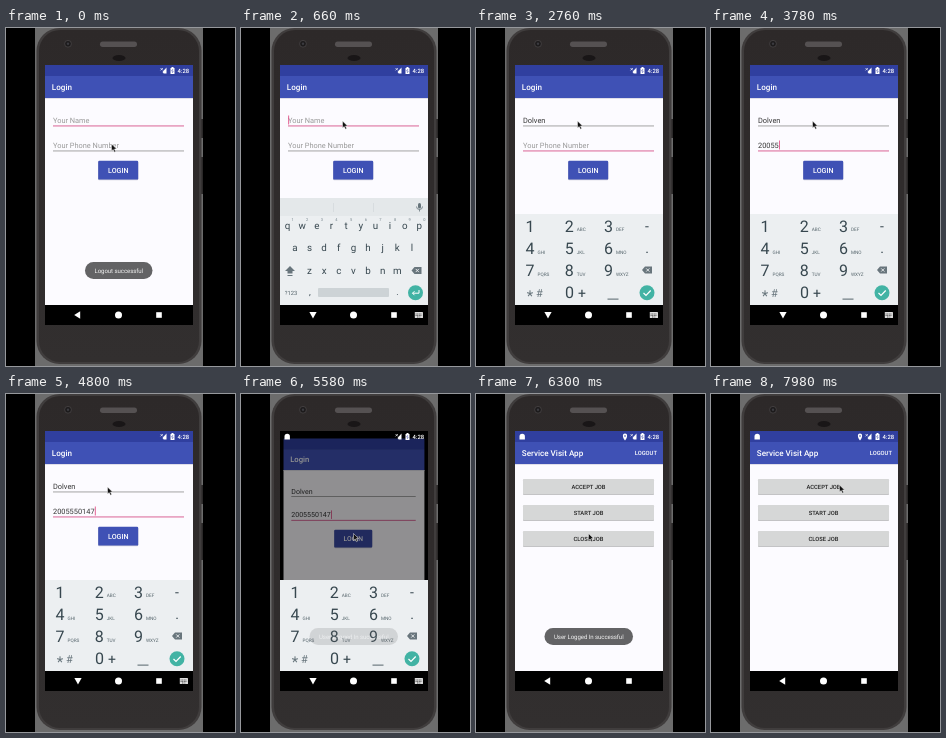
An HTML page for the animation above (8000 ms loop, 229x338 px).

```html
<!DOCTYPE html>
<html lang="en">
<head>
<meta charset="utf-8">
<title>Login demo</title>
<style>
html, body { margin: 0; width: 100%; height: 100%; overflow: hidden; background: #000; }
svg { display: block; width: 100vw; height: 100vh; font-family: Roboto, sans-serif; text-rendering: geometricPrecision; }
.bold { font-weight: 500; }
</style>
</head>
<body>
<svg id="stage" viewBox="0 0 229 338">
  <defs>
    <clipPath id="screen"><rect x="39" y="37" width="148" height="260"/></clipPath>
    <linearGradient id="shell" x2="0" y2="1">
      <stop offset="0" stop-color="#2d2929"/><stop offset="1" stop-color="#322f2f"/>
    </linearGradient>
  </defs>
  <rect width="229" height="338"/>
  <rect x="29" width="168" height="338" fill="#6c6c6c"/>
  <rect x="194" y="91" width="3" height="19" fill="#2a2828"/>
  <rect x="194" y="129" width="3" height="37" fill="#2a2828"/>
  <rect x="30.5" y="0" width="165" height="336" rx="23" fill="#403d3d"/>
  <rect x="33" y="2" width="160" height="332" rx="21" fill="url(#shell)"/>
  <circle cx="62" cy="15.8" r="3.4" fill="#1d1b1c" stroke="#494647" stroke-width=".8"/>
  <circle cx="62" cy="15.8" r="1.2" fill="#3b3b40"/>
  <rect x="94" y="13.5" width="37" height="5.5" rx="2.7" fill="#555152"/>
  <ellipse cx="113" cy="30" rx="6.5" ry="3" fill="#191617"/>
  <g clip-path="url(#screen)">
    <rect x="39" y="37" width="148" height="260"/>
    <g id="login"></g>
    <g id="main"></g>
    <g id="status"></g>
    <g id="letters"></g>
    <g id="numbers"></g>
    <g id="firstToast"></g>
    <g id="secondToast"></g>
    <g id="nav"></g>
  </g>
  <path id="pointer" d="M0 0V8.2L2 6.5L3.4 9.6L4.9 8.9L3.5 5.9H6Z" fill="#111" stroke="#fff" stroke-width=".55"/>
</svg>
<script>
const LOOP = 8000;
const NAME = 'Dolven', PHONE = '2005550147';
const NAME_START = 700, NAME_STEP = 100;
const PHONE_START = 3050, PHONE_STEP = 160;
const OPEN_AT = 430, NUMERIC_AT = 1800, PRESS_AT = 5440, MAIN_AT = 5640;

const $ = id => document.getElementById(id);
const text = (x, y, size, str, fill = '#222', extra = '') =>
  `<text x="${x}" y="${y}" font-size="${size}" fill="${fill}" ${extra}>${str}</text>`;
const mid = (x, y, size, str, fill, extra = '') =>
  text(x, y, size, str, fill, `text-anchor="middle" ${extra}`);
const rect = (x, y, w, h, fill, extra = '') =>
  `<rect x="${x}" y="${y}" width="${w}" height="${h}" fill="${fill}" ${extra}/>`;
const path = (d, fill, extra = '') => `<path d="${d}" fill="${fill}" ${extra}/>`;
const bold = 'class="bold"';

const appBar = title =>
  rect(39, 37, 148, 11, '#303f9f') + rect(39, 48, 148, 22, '#3f51b5') +
  text(45.8, 61.6, 8.1, title, '#fff', bold);

const page = rect(39, 70, 148, 207, '#fcfbff') + rect(39, 70, 148, .7, '#d3d3e0');

const field = (id, y) =>
  text(47, y + 3, 7.4, '', '#333', `id="${id}"`) +
  rect(47, y + 5.5, 131, .9, '#999', `id="${id}Line"`) +
  rect(47, y - 4.5, .8, 9, '#e0407c', `id="${id}Caret"`);

const backspace = (x, y) =>
  path(`M${x - 5} ${y}l3-3.5h7v7h-7z`, '#68757c') +
  path(`M${x - .8} ${y - 1.6}l3.2 3.2m0-3.2l-3.2 3.2`, 'none', 'stroke="#edf0f2" stroke-width=".9"');

const toast = (x, w, str) =>
  rect(x, 234, w, 17, '#636365', 'rx="8.5"') +
  mid(x + w / 2, 244.8, 6.1, str, '#f1f1f1', 'letter-spacing="-.08"');

function build() {
  $('login').innerHTML = appBar('Login') + page +
    field('name', 92) + rect(47, 96, 25, .6, '#333', 'id="composing"') + field('phone', 117) +
    rect(92, 133.3, 40.3, 19, '#c9c9d6', 'rx="1.2"') +
    rect(92.2, 132.8, 40, 18.8, '#3f51b5', 'rx="1.2" id="loginButton"') +
    mid(112.3, 145, 7.1, 'LOGIN', '#fff', bold) +
    rect(39, 37, 148, 260, '#000', 'id="dim"');

  const jobs = ['ACCEPT JOB', 'START JOB', 'CLOSE JOB'].map((label, i) =>
    rect(47, 85.5 + 26 * i, 131, 15.5, '#bcbcbe', 'rx="1"') +
    rect(47, 85 + 26 * i, 131, 15.2, '#d6d7d7', 'rx="1"') +
    mid(112.5, 94.7 + 26 * i, 5.8, label, '#222', bold));
  $('main').innerHTML = appBar('Service Visit App') +
    text(158.7, 61, 5.8, 'LOGOUT', '#fff', bold) + page + jobs.join('');

  $('status').innerHTML =
    path('M160.5 39.5v6h-2.8l-1.2-1.5z', '#fff') +
    path('M154.5 40l2.4 2.4m0-2.4l-2.4 2.4', 'none', 'stroke="#fff" stroke-width=".7"') +
    path('M164.5 40h1v-1h2v1h1v6h-4z', '#fff') +
    path('M167 41l-1.5 2h1.7l-1 2', 'none', 'stroke="#303f9f" stroke-width=".5"') +
    text(171.5, 45.2, 5.9, '4:28', '#fff', bold) +
    `<g id="notice">${path('M43.5 45.5v-3a2.7 2.7 0 0 1 5.4 0v3z', '#fff')}</g>` +
    `<g id="place">${path('M149 46.5c-3-3.5-2.6-7 0-7s3 3.5 0 7z', '#fff')}<circle cx="149" cy="42" r=".8" fill="#303f9f"/></g>`;

  $('firstToast').innerHTML = toast(79, 67.5, 'Logout successful');
  $('secondToast').innerHTML = toast(68.5, 88.5, 'User Logged In successful');
  $('letters').innerHTML = letterKeys();
  $('numbers').innerHTML = numberKeys();
  $('nav').innerHTML = rect(39, 277, 148, 20, '#000') + path('', '#fff', 'id="back"') +
    '<circle cx="112.5" cy="287" r="3.5" fill="#fff"/>' + rect(150.2, 284.2, 5.6, 5.6, '#fff') +
    `<g id="switcher">${rect(173.8, 284, 8.2, 6, '#ddd', 'rx=".6"')}` +
    path('M174.6 286h6.5m-6.5 1.5h6.5M176 289h3.5', 'none', 'stroke="#222" stroke-width=".7" stroke-dasharray="1 .6"') + '</g>';
}

function letterKeys() {
  const row = (chars, x, y, size = 9.8, fill = '#37474f') =>
    [...chars].map((c, i) => mid(x + 14.65 * i, y, size, c, fill)).join('');
  return rect(39, 170, 148, 108, '#eceff1') + rect(39, 170, 148, 18, '#e4e8ea') +
    `<g id="hints">${mid(72.5, 182, 7.3, NAME + "'s", '#66747b')}` +
    mid(152, 182, 7.3, 'Dolmen', '#66747b') +
    mid(112.5, 187, 6, '•••', '#66747b', 'letter-spacing="-.5"') + '</g>' +
    mid(112.5, 182, 7.3, '', '#37474f', 'id="guess" font-weight="600"') +
    rect(92, 175, .5, 9, '#cbd1d4') + rect(132.5, 175, .5, 9, '#cbd1d4') +
    rect(177, 175, 3, 5.5, '#66747b', 'rx="1.5"') +
    path('M175.5 178.5a3 3 0 0 0 6 0M178.5 181.5v2', 'none', 'stroke="#66747b" stroke-width=".8"') +
    row('1234567890', 51.5, 193, 4, '#78868d') +
    row('qwertyuiop', 46.5, 201.3) + row('asdfghjkl', 53.8, 223.3) + row('zxcvbnm', 68.5, 245.5) +
    path('M49 238l5 5h-2.5v2.5h-5V243H44z', '#68757c') + rect(46.5, 247, 5, 1, '#68757c') +
    backspace(175.5, 242.5) +
    mid(50, 267, 5.8, '?123', '#55646b') + mid(69, 267, 9, ',', '#37474f') +
    rect(77, 260, 71, 9, '#cdd3d6', 'rx="1"') + mid(156.5, 267, 9, '.', '#37474f') +
    '<circle cx="174.5" cy="264.7" r="7.5" fill="#42b3a4"/>' +
    path('M178 262v3.2h-6.5m2-2l-2 2l2 2', 'none', 'stroke="#fff" stroke-width="1"');
}

function numberKeys() {
  const labels = ['', 'ABC', 'DEF', 'GHI', 'JKL', 'MNO', 'PQRS', 'TUV', 'WXYZ'];
  const keys = labels.map((label, i) => {
    const x = 54 + 39.2 * (i % 3), y = 203.6 + 22.2 * Math.floor(i / 3);
    return mid(x, y, 16, i + 1, '#37474f') + text(x + 7.5, y - .3, 4.7, label, '#55646b');
  });
  return rect(39, 186, 148, 92, '#eceff1') + keys.join('') +
    mid(171, 202.5, 14, '-', '#37474f') + mid(171, 224.5, 14, '.', '#37474f') + backspace(171, 242) +
    mid(54, 273, 15, '*', '#66747b') + mid(63.5, 268.5, 11, '#', '#66747b') +
    mid(93.5, 270.2, 16, '0', '#37474f') + mid(106, 270, 14, '+', '#37474f') +
    rect(131.5, 270.6, 11, 1, '#55646b') +
    '<circle cx="171" cy="264.7" r="7.5" fill="#42b3a4"/>' +
    path('M167.5 265l2.5 2.5l4.7-5', 'none', 'stroke="#fff" stroke-width="1.2"');
}

const clamp = v => Math.max(0, Math.min(1, v));
const ramp = (t, a, b) => { const p = clamp((t - a) / (b - a)); return p * p * (3 - 2 * p); };
const fade = (id, v) => { $(id).style.opacity = v; };
const show = (id, on) => { $(id).style.display = on ? '' : 'none'; };
const shift = (id, y) => $(id).setAttribute('transform', `translate(0 ${y})`);

// Pointer stops as time, x, y
const route = [[0, 105.5, 116], [60, 105.5, 116], [400, 101.5, 93], [4950, 101.5, 93], [5350, 112.5, 139.5],
  [6600, 112.5, 139.5], [7140, 191, 94], [7400, 180, 91], [7860, 128.5, 91], [LOOP, 128.5, 91]];

function pointerAt(t) {
  const i = route.findIndex(stop => stop[0] > t);
  const [a, b] = [route[i - 1], route[i]], p = ramp(t, a[0], b[0]);
  return [a[1] + (b[1] - a[1]) * p, a[2] + (b[2] - a[2]) * p];
}

function drawField(id, value, hint, focused, sinceKey) {
  const node = $(id);
  node.textContent = value || hint;
  node.setAttribute('fill', value ? '#333' : '#999');
  $(id + 'Line').setAttribute('fill', focused ? '#d6538a' : '#999');
  const blink = Math.floor(sinceKey / 500) % 2 === 0;
  show(id + 'Caret', focused && blink);
  $(id + 'Caret').setAttribute('x', 47.3 + (value ? node.getComputedTextLength() : 0));
}

function draw(t) {
  const typed = (str, start, step) => str.slice(0, Math.max(0, Math.floor((t - start) / step) + 1));
  const sinceKey = (count, start, step, idle) => t - (count ? start + (count - 1) * step : idle);
  const name = typed(NAME, NAME_START, NAME_STEP), phone = typed(PHONE, PHONE_START, PHONE_STEP);
  const onPhone = t >= NUMERIC_AT;

  show('login', t < MAIN_AT + 130);
  drawField('name', name, 'Your Name', !onPhone, sinceKey(name.length, NAME_START, NAME_STEP, OPEN_AT));
  drawField('phone', phone, 'Your Phone Number', onPhone, sinceKey(phone.length, PHONE_START, PHONE_STEP, NUMERIC_AT));
  show('composing', name && !onPhone);
  $('composing').setAttribute('width', name ? $('name').getComputedTextLength() : 0);
  $('loginButton').setAttribute('fill', t > 5380 && t < MAIN_AT ? '#3949a3' : '#3f51b5');

  const leave = ramp(t, PRESS_AT, 5570);
  $('login').setAttribute('transform',
    `translate(112.5 190) scale(${1 - .05 * leave}) translate(-112.5 -190)`);
  fade('dim', .43 * leave);
  fade('main', ramp(t, MAIN_AT, MAIN_AT + 130));

  show('notice', t >= 5500);
  show('place', t >= MAIN_AT + 100);
  fade('firstToast', 1 - ramp(t, 300, 600));
  fade('secondToast', ramp(t, 5520, 5740) * (1 - ramp(t, 6950, 7270)));

  const rise = ramp(t, OPEN_AT, OPEN_AT + 170), fall = ramp(t, 5620, 5800);
  show('letters', rise > 0 && !onPhone);
  shift('letters', 108 * (1 - rise));
  show('numbers', onPhone && fall < 1);
  shift('numbers', 92 * fall);
  $('guess').textContent = name;
  show('hints', name.length > 2);

  const open = t >= OPEN_AT && t < 5700;
  $('back').setAttribute('d', open ? 'M68.4 284h7.2l-3.6 6.5z' : 'M68.2 287l6-3.7v7.4z');
  show('switcher', open);

  $('pointer').setAttribute('transform', `translate(${pointerAt(t)}) scale(.85)`);
}

build();
const start = performance.now();
function tick() {
  draw((performance.now() - start) % LOOP);
  requestAnimationFrame(tick);
}
tick();
</script>
</body>
</html>
```
